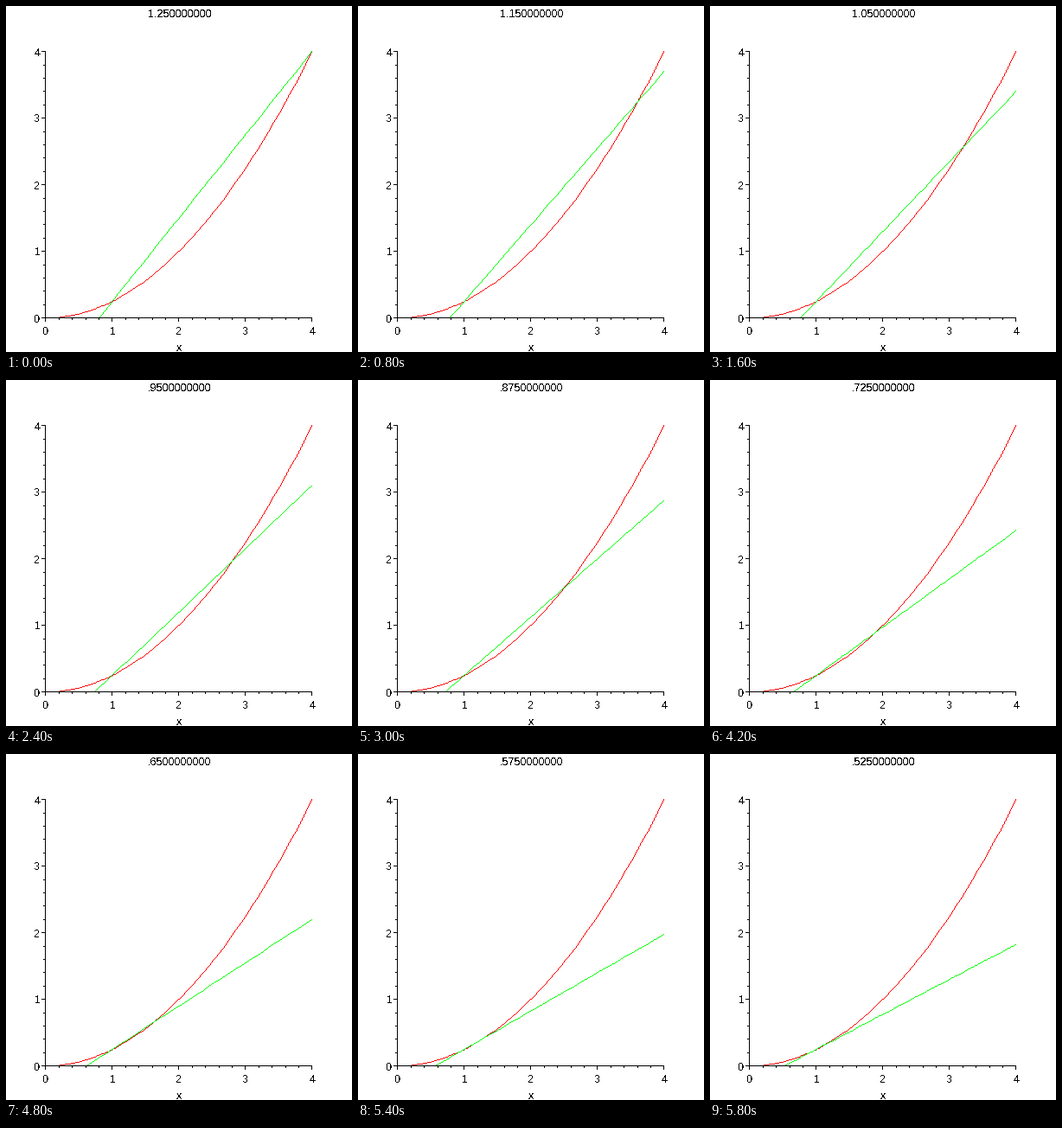
Write a matplotlib script that moves like this. It is 400 by 400 pixels and loops after 6 s.

```python
import numpy as np
import matplotlib.pyplot as plt
from matplotlib.animation import FuncAnimation

SIZE, DPI = 400, 100
FRAMES, INTERVAL = 30, 200
UNIT = 77  # pixels per axis unit
BLACK, RED, GREEN = (0, 0, 0), (255, 0, 0), (0, 255, 0)

plt.rcParams.update({
    "font.family": "Liberation Sans",
    "font.size": 12.6 * 72 / DPI,
    "text.antialiased": False,
    "toolbar": "None",
})


def pixel(v):
    return np.rint(v).astype(int)


def col(x):
    return pixel(45.45 + UNIT * np.asarray(x))


def row(y):
    return pixel(360.2 - UNIT * np.asarray(y))


def draw_path(img, xs, ys, color):
    """Draw a one-pixel polyline whose vertices sit on whole pixels."""
    px, py = col(xs), row(ys)
    for x0, y0, x1, y1 in zip(px, py, px[1:], py[1:]):
        n = max(abs(x1 - x0), abs(y1 - y0)) + 1
        img[pixel(np.linspace(y0, y1, n)), pixel(np.linspace(x0, x1, n))] = color


def draw_axes(img):
    left, right, top, base = col(0), col(4), row(4), row(0)
    img[base, left:right + 1] = BLACK
    img[top:base + 1, left] = BLACK
    for i in range(21):
        size = 4 if i % 5 == 0 else 2
        img[base:base + size + 1, col(i / 5)] = BLACK
        img[row(i / 5), left - size:left + 1] = BLACK


def slope_at(frame):
    return 1.25 - 0.025 * frame


def slope_text(m):
    return f"{m:.9f}" if m > 0.9999 else f"{m:.10f}"[1:]


def render(frame):
    img = np.full((SIZE, SIZE, 3), 255, np.uint8)
    xs = np.linspace(0, 4, 50)
    draw_path(img, xs, xs ** 2 / 4, RED)
    m = slope_at(frame)
    root = 1 - 0.25 / m
    xs = np.append(root, xs[xs > root])
    draw_path(img, xs, 0.25 + m * (xs - 1), GREEN)
    draw_axes(img)
    return img


fig = plt.figure(figsize=(SIZE / DPI, SIZE / DPI), dpi=DPI, facecolor="white")
ax = fig.add_axes([0, 0, 1, 1])
ax.axis("off")
canvas = ax.imshow(render(0), extent=(0, SIZE, SIZE, 0),
                   interpolation="nearest", aspect="auto")


def label(x, y, text):
    return ax.text(x, y, text, ha="center", va="baseline", color="black")


for n in range(5):
    label(46.4 + UNIT * n, 380, str(n))
    label(36.2, 365.5 - UNIT * n, str(n))
label(200.5, 399, "x")
title = label(200.6, 13, slope_text(slope_at(0)))


def update(frame):
    canvas.set_data(render(frame))
    title.set_text(slope_text(slope_at(frame)))
    return canvas, title


anim = FuncAnimation(fig, update, frames=FRAMES, interval=INTERVAL,
                     repeat=True, repeat_delay=0)
plt.show()
```
